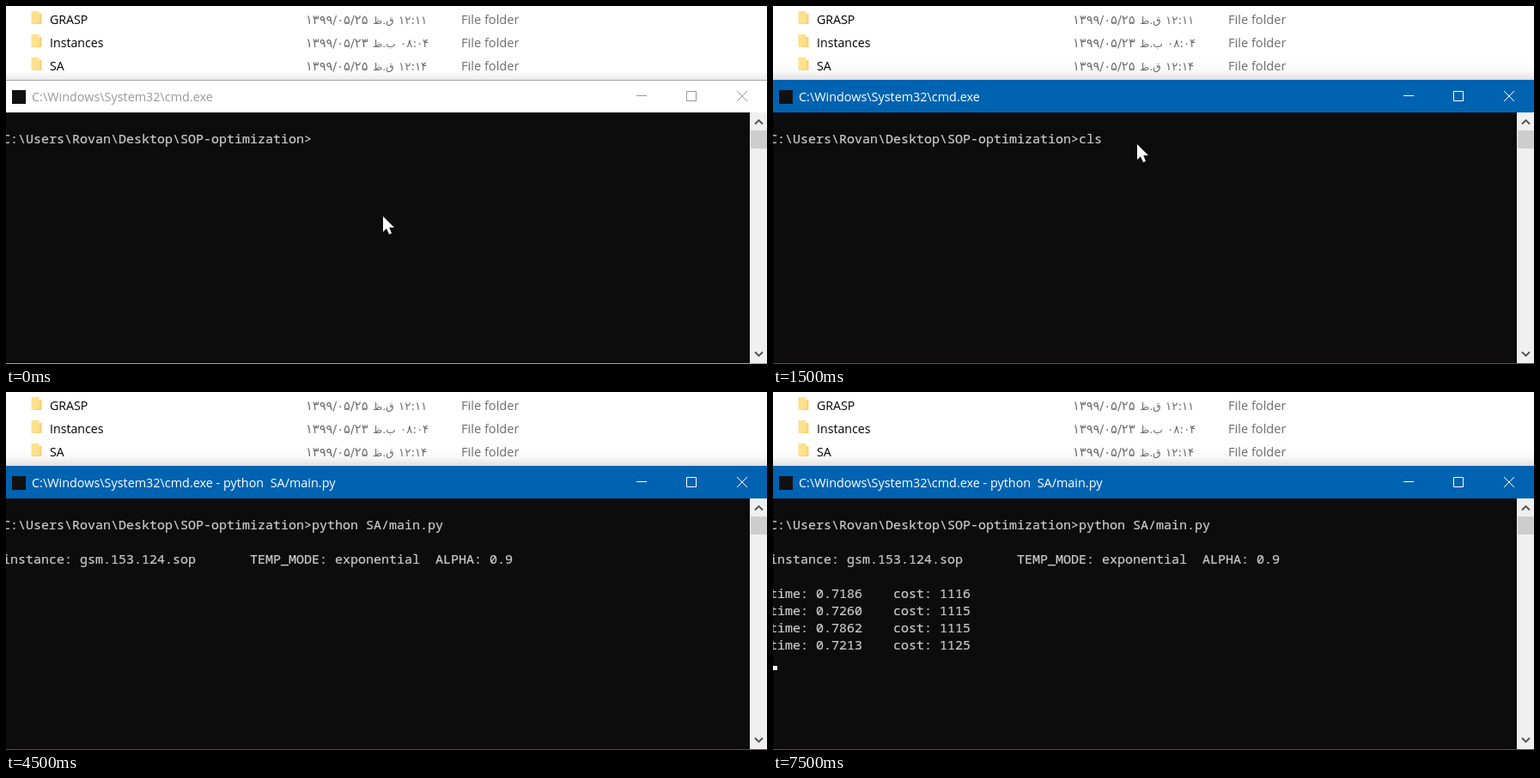
These frames come from a looping animation (886x417 px, 8000 ms). An HTML page:

```html
<!DOCTYPE html>
<html lang="en">
<head>
<meta charset="utf-8">
<title>Console run</title>
<style>
  html, body { margin: 0; width: 100%; height: 100%; overflow: hidden; background: #fff; }
  svg { display: block; width: 886px; height: 417px; }
  text { white-space: pre; font: 14.2px "Open Sans", "Noto Sans", sans-serif; }
  .muted { fill: #6d6d6d; }
  .muted text { font-size: 14.6px; }
  .muted .date { font: 14.6px "DejaVu Sans", sans-serif; }
  .muted .half { font: 12.2px "DejaVu Sans", sans-serif; }
  .muted .time { font: 13.4px "DejaVu Sans", sans-serif; }
  .chrome text { font-size: 14.4px; }
  .console text {
    font: 15px "Noto Sans Mono", "DejaVu Sans Mono", monospace;
    fill: #ccc; stroke: #ccc; stroke-width: .2px;
  }

  /* Every change is a hard cut on one shared 8 s clock. */
  .shadow, .frame, .bar, .chrome, .suffix, .pointer, .caret, .cls, .run, .params, .first, .second, .rest {
    animation: 8s step-end infinite;
  }
  .shadow  { animation-name: focus; }
  .frame   { animation-name: frame; }
  .bar     { animation-name: bar; }
  .chrome  { animation-name: chrome; }
  .suffix  { animation-name: suffix; }
  .pointer { animation-name: pointer; }
  .caret   { animation-name: caret; }
  .cls     { animation-name: cls; }
  .run     { animation-name: run; }
  .params  { animation-name: params; }
  .first   { animation-name: first; }
  .second  { animation-name: second; }
  .rest    { animation-name: rest; }

  @keyframes focus  { 0% { opacity: 0 } 6.25%, 100% { opacity: 1 } }
  @keyframes frame  { 0% { fill: #a5a5a5 } 6.25%, 100% { fill: #0063b1 } }
  @keyframes bar    { 0% { fill: #fff } 6.25%, 100% { fill: #0063b1 } }
  @keyframes chrome { 0% { color: #999 } 6.25%, 100% { color: #fff } }
  @keyframes suffix { 0% { fill-opacity: 0 } 37.5%, 100% { fill-opacity: 1 } }
  @keyframes cls    { 0% { opacity: 0 } 15.625% { opacity: 1 } 25%, 100% { opacity: 0 } }
  @keyframes run    { 0% { opacity: 0 } 25%, 100% { opacity: 1 } }
  @keyframes params { 0% { opacity: 0 } 56.25%, 100% { opacity: 1 } }
  @keyframes first  { 0% { opacity: 0 } 65.625%, 100% { opacity: 1 } }
  @keyframes second { 0% { opacity: 0 } 75%, 100% { opacity: 1 } }
  @keyframes rest   { 0% { opacity: 0 } 84.375%, 100% { opacity: 1 } }
  @keyframes pointer {
    0%      { transform: translate(439px, 245px); opacity: 1 }
    3.125%  { transform: translate(424px, 161px); opacity: 1 }
    43.75%  { transform: translate(635px, 144px); opacity: 1 }
    46.875%, 100% { transform: translate(635px, 144px); opacity: 0 }
  }
  @keyframes caret {
    0%      { transform: translate(356px, 159px); opacity: 0 }
    12.5%   { transform: translate(356px, 159px); opacity: 1 }
    15.625% { transform: translate(383px, 159px); opacity: 1 }
    18.75%  { transform: translate(383px, 159px); opacity: 0 }
    25%     { transform: translate(509px, 159px); opacity: 1 }
    31.25%  { transform: translate(509px, 159px); opacity: 0 }
    37.5%   { transform: translate(-4px, 179px); opacity: 1 }
    43.75%  { transform: translate(-4px, 179px); opacity: 0 }
    50%     { transform: translate(-4px, 179px); opacity: 1 }
    56.25%  { transform: translate(-4px, 179px); opacity: 0 }
    81.25%  { transform: translate(-4px, 279px); opacity: 1 }
    84.375% { transform: translate(-4px, 279px); opacity: 0 }
    93.75%, 100% { transform: translate(-4px, 319px); opacity: 1 }
  }
</style>
</head>
<body>
<svg viewBox="0 0 886 417">
  <defs>
    <linearGradient id="fade" x2="0" y2="1">
      <stop offset="0" stop-opacity="0"/>
      <stop offset="1" stop-opacity="1"/>
    </linearGradient>
    <g id="folder">
      <path d="M29.500 6h9v13l-9 2z" fill="#ffe08c"/>
      <path d="M38.500 9h3v12h-12l9-2z" fill="#f8d272"/>
    </g>
  </defs>

  <rect width="886" height="417" fill="#fff"/>
  <rect y="76" width="886" height="10" fill="url(#fade)" opacity=".08"/>
  <g class="shadow">
    <rect y="63" width="886" height="23" fill="url(#fade)" opacity=".04"/>
  </g>

  <g>
    <use href="#folder"/>
    <text x="51" y="21">GRASP</text>
    <g class="muted">
      <text class="date" x="349" y="21">۱۳۹۹/۰۵/۲۵</text>
      <text class="half" x="427" y="21">ق.ظ</text>
      <text class="time" x="457" y="21">۱۲:۱۱</text>
      <text x="530" y="21">File folder</text>
    </g>
  </g>
  <g transform="translate(0 27)">
    <use href="#folder"/>
    <text x="51" y="21">Instances</text>
    <g class="muted">
      <text class="date" x="349" y="21">۱۳۹۹/۰۵/۲۳</text>
      <text class="half" x="427" y="21">ب.ظ</text>
      <text class="time" x="459" y="21">۰۸:۰۴</text>
      <text x="530" y="21">File folder</text>
    </g>
  </g>
  <g transform="translate(0 54)">
    <use href="#folder"/>
    <text x="51" y="21">SA</text>
    <g class="muted">
      <text class="date" x="349" y="21">۱۳۹۹/۰۵/۲۵</text>
      <text class="half" x="427" y="21">ق.ظ</text>
      <text class="time" x="457" y="21">۱۲:۱۴</text>
      <text x="530" y="21">File folder</text>
    </g>
  </g>

  <rect class="frame" y="86" width="886" height="331"/>
  <rect class="bar" y="87" width="886" height="37"/>
  <rect x="7" y="98" width="16" height="16" fill="#111"/>
  <g class="chrome">
    <text x="30" y="111" fill="currentColor">C:\Windows\System32\cmd.exe<tspan class="suffix"> - python  SA/main.py</tspan></text>
    <path d="M734 104.500h12M792.500 99.500h11v11h-11zM851 99l12 12M863 99l-12 12" fill="none" stroke="currentColor"/>
  </g>

  <rect y="124" width="866" height="292" fill="#0c0c0c"/>
  <g>
    <rect x="866" y="124" width="20" height="292" fill="#f0f0f0"/>
    <rect x="867" y="145" width="19" height="21" fill="#cdcdcd"/>
    <path d="M872 137.500l4.500-4.500 4.500 4.500M872 403l4.500 4.500 4.500-4.500" fill="none" stroke="#505050" stroke-width="1.800"/>
  </g>

  <g class="console">
    <text x="-4" y="160">C:\Users\Rovan\Desktop\SOP-optimization&gt;</text>
    <text class="cls" x="356" y="160">cls</text>
    <text class="run" x="356" y="160">python SA/main.py</text>
    <text class="params" x="-4" y="200">instance: gsm.153.124.sop       TEMP_MODE: exponential  ALPHA: 0.9</text>
    <text class="first" x="-4" y="240">time: 0.7186    cost: 1116</text>
    <text class="second" x="-4" y="260">time: 0.7260    cost: 1115</text>
    <g class="rest">
      <text x="-4" y="280">time: 0.7862    cost: 1115</text>
      <text x="-4" y="300">time: 0.7213    cost: 1125</text>
    </g>
    <rect class="caret" width="9" height="5" fill="#f2f2f2"/>
  </g>

  <path class="pointer" d="M0 0V18L4 14.300L7 21L10 19.800L7.200 13H13Z" fill="#fff" stroke="#0c0c0c" paint-order="stroke"/>
</svg>
</body>
</html>
```
